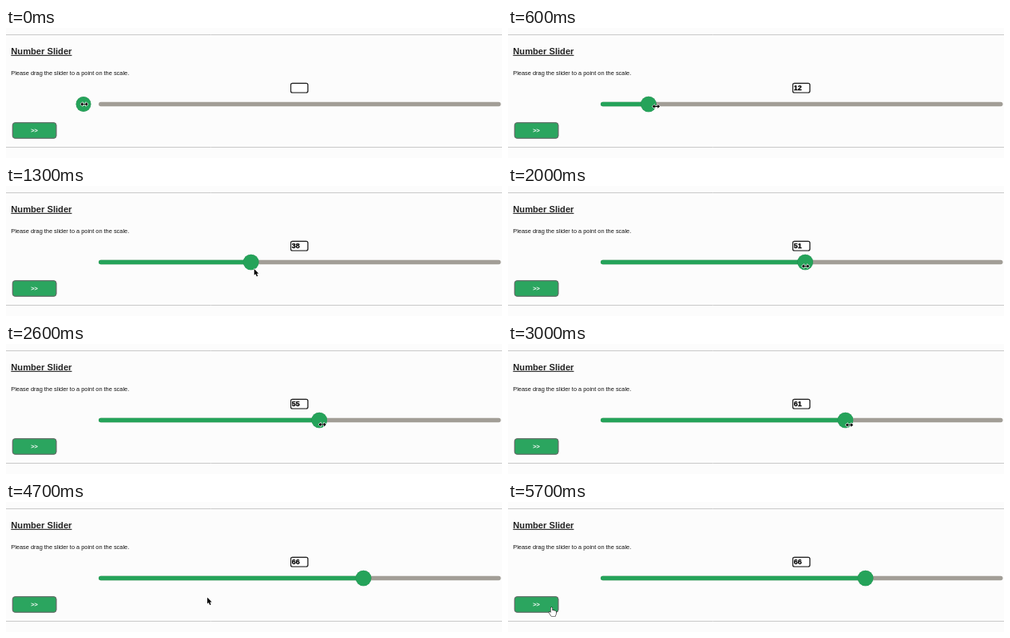
These frames come from a looping animation (621 px wide and 163 px high, 5.8 s). An HTML page:

```html
<!DOCTYPE html>
<html lang="en">
<head>
<meta charset="utf-8">
<title>Number Slider</title>
<style>
  html, body { margin: 0; width: 100%; height: 100%; overflow: hidden; background: #fcfcfc; }
  svg { display: block; width: 621px; height: 163px; font: 7.4px Arial, "Liberation Sans", sans-serif; }
  .title { font-size: 11.15px; font-weight: bold; fill: #222; text-decoration: underline; }
  .value { font-size: 9px; font-weight: bold; stroke: #000; stroke-width: .25px; }
  .shadow { filter: drop-shadow(.4px .8px .7px #0006); }
  #cursor path { stroke-width: 1.1px; stroke-linejoin: round; paint-order: stroke; }
</style>
</head>
<body>
<svg viewBox="0 0 621 163">
  <path d="M0 8.5H621M0 149.5H621" stroke="#c9c9c9"/>
  <text class="title" x="6.3" y="32.8">Number Slider</text>
  <text x="6.3" y="58.8" fill="#111">Please drag the slider to a point on the scale.</text>

  <rect class="shadow" x="356.6" y="69.4" width="21.3" height="11.6" rx="2" fill="#fff" stroke="#222" stroke-width="1.2"/>
  <text class="value" id="value" x="357.8" y="78.3"></text>

  <rect x="116" y="92.7" width="503.5" height="5.5" rx="2.7" fill="#a29e97"/>
  <rect id="fill" x="116" y="92.7" height="5.5" rx="2.7" fill="#25a35a"/>
  <circle class="shadow" id="handle" cy="95.5" fill="#25a35a"/>

  <rect class="shadow" x="8.3" y="118.8" width="54.6" height="19.4" rx="3" fill="#2ba55f" stroke="#666"/>
  <text x="35.5" y="131" text-anchor="middle" fill="#fff" stroke="#fff" stroke-width=".2">&gt;&gt;</text>

  <g id="cursor">
    <path id="resize" d="M-4.7 0L-1.9 -2.5V-.6H1.9V-2.5L4.7 0L1.9 2.5V.6H-1.9V2.5Z" stroke="#fff"/>
    <path id="arrow" d="M0 0V7.8L1.8 6.2L3.2 9.4L4.5 8.8L3.2 5.7H5.6Z" stroke="#fff"/>
    <path id="hand" d="M-.9 .8Q0 -.6 .9 .8V4Q2 3.2 2.6 4.2Q3.7 3.6 4.2 4.7Q5.6 4.3 5.6 6V8L4.7 11H-.2L-3 7Q-3.3 5.5 -2 5.8L-.9 7Z" fill="#fff" stroke="#111"/>
  </g>
</svg>
<script>
  const LOOP = 5800, STEP = 100;
  const LEAVE = 4200, ARRIVE = 5200, BUTTON = [54.5, 132];
  const $ = id => document.getElementById(id);
  const mix = (a, b, p) => a + (b - a) * p;
  const clamp = p => Math.min(1, Math.max(0, p));
  const ease = p => p * p * (3 - 2 * p);
  const toX = value => 115.6 + 5.03 * value;

  // Drag: [ms, slider value, pointer's lead over the handle, pointer y]; below 0 the handle is parked
  const drag = [
    [0, -3.7, 1, 95.5], [600, 12, 9.5, 98.3], [1300, 38, 4, 104], [2000, 51, 0.5, 100.5],
    [2300, 51, 0.5, 100.5], [3000, 61, 5, 101.5], [3700, 66, 2, 107.5],
  ];

  function dragAt(t) {
    const i = Math.max(1, drag.findIndex(key => key[0] >= t));
    const [a, b] = t > drag.at(-1)[0] ? drag.slice(-2) : [drag[i - 1], drag[i]];
    const p = clamp((t - a[0]) / (b[0] - a[0]));
    return a.map((v, k) => mix(v, b[k], p)).slice(1);
  }

  function draw(now) {
    const t = Math.floor(now % LOOP / STEP) * STEP;
    const [raw, lead, dragY] = dragAt(t);

    const active = raw >= 0;
    const value = active ? Math.round(raw) : drag[0][1];
    const x = toX(value);
    $('handle').setAttribute('cx', x);
    $('handle').setAttribute('r', active ? 9.8 : 9.4);
    $('fill').setAttribute('width', Math.max(0, x - 116));
    $('value').textContent = active ? value : '';

    const away = ease(clamp((t - LEAVE) / (ARRIVE - LEAVE)));
    const px = mix(toX(raw) + lead, BUTTON[0], away);
    const py = mix(dragY, BUTTON[1], away);
    const shape = px < 63 ? 'hand' : py < 102 ? 'resize' : 'arrow';
    $('cursor').setAttribute('transform', `translate(${px} ${py})`);
    for (const id of ['resize', 'arrow', 'hand'])
      $(id).style.display = id === shape ? '' : 'none';
  }

  function tick() {
    draw(performance.now() - start);
    requestAnimationFrame(tick);
  }
  const start = performance.now();
  tick();
</script>
</body>
</html>
```
